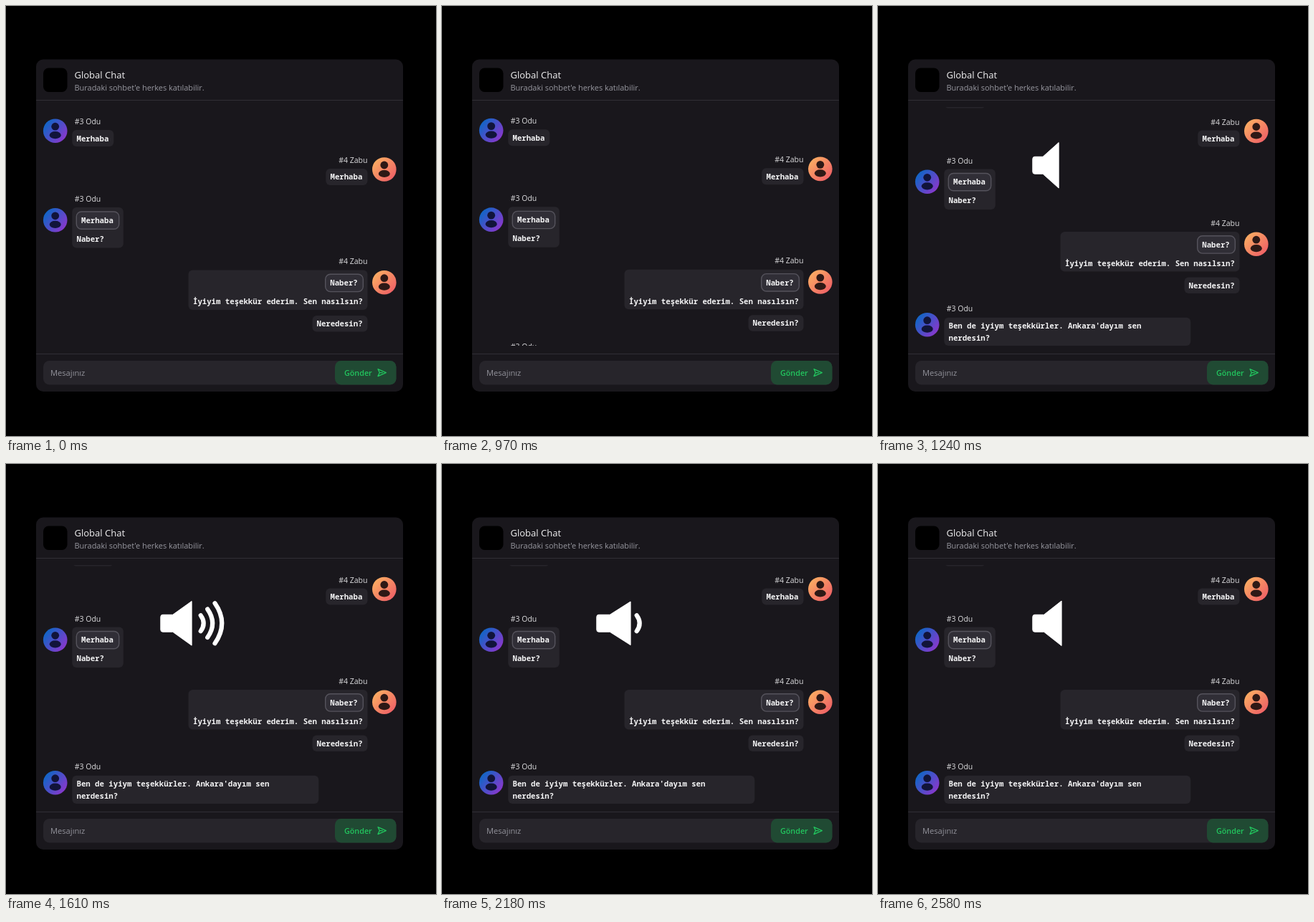
Write an HTML page that moves like this. It is 600 px wide and 600 px high and loops after 2.61 s.

```html
<!DOCTYPE html>
<html lang="tr">
<head>
<meta charset="utf-8">
<title>Global Chat</title>
<style>
  html, body { margin: 0; width: 100%; height: 100%; overflow: hidden; background: #000; }
  svg { display: block; width: 600px; height: 600px; }
  text { font-family: "Open Sans", "Noto Sans", sans-serif; white-space: pre; }
  .name { font-size: 10.5px; fill: #dedee0; }
  .msg { font: 600 10.68px "Noto Sans Mono", "DejaVu Sans Mono", monospace; fill: #f4f4f5; }
  .bubble, .field { fill: #27252b; }
  .quote { fill: #302e36; stroke: #55535c; stroke-width: 1.4; }
  .rule { stroke: #302e35; }
  .wave { fill: none; stroke: #fff; stroke-width: 6.2; stroke-linecap: round; }
  .plane { fill: none; stroke: #22c55e; stroke-width: 1.3; stroke-linejoin: round; stroke-linecap: round; }
</style>
</head>
<body>
<svg viewBox="0 0 600 600">
  <defs>
    <linearGradient id="blue" x1="0" y1="0.1" x2="1" y2="0.9">
      <stop offset="0.15" stop-color="#1763c6"/><stop offset="0.95" stop-color="#8f35cc"/>
    </linearGradient>
    <linearGradient id="orange" x1="0" y1="0" x2="1" y2="1">
      <stop offset="0.1" stop-color="#fbae62"/><stop offset="0.9" stop-color="#ee5f66"/>
    </linearGradient>
    <clipPath id="view"><rect x="42" y="141" width="512" height="333"/></clipPath>
  </defs>

  <rect x="42" y="74.5" width="512" height="463.5" rx="10" fill="#19171c"/>
  <rect x="52" y="86.5" width="33.5" height="33.5" rx="7.5" fill="#000"/>
  <text x="95.5" y="100.7" font-size="13" fill="#f0f0f1">Global Chat</text>
  <text x="95.5" y="117.5" font-size="10.95" fill="#97979f">Buradaki sohbet'e herkes katılabilir.</text>
  <path class="rule" d="M42 131.5H554M42 485.5H554"/>

  <g clip-path="url(#view)"><g id="list"></g></g>

  <rect class="field" x="52" y="495" width="492.5" height="33.5" rx="8.5"/>
  <text x="62" y="516" font-size="11.15" fill="#92929a">Mesajınız</text>
  <rect x="459" y="495" width="85.5" height="33.5" rx="8.5" fill="#204a33"/>
  <text x="472" y="516" font-size="10.75" font-weight="600" fill="#22c55e">Gönder</text>
  <path class="plane" d="M519 506.6L530.3 511.6L519 516.6L521.3 511.6ZM521.3 511.6H525.5"/>

  <g id="sound">
    <path id="horn" fill="#fff" stroke="#fff" stroke-width="1" stroke-linejoin="round"/>
    <g id="waves"></g>
  </g>
</svg>
<script>
const LOOP = 2610;
const SCROLL = { start: 935, length: 250, distance: 53.5 };
const SOUND = { start: 1120, origin: 1240, period: 740 };
const USERS = {
  odu: { label: "#3 Odu", x: 95.7, anchor: "start", cx: 68.7, paint: "blue", ink: "#11143a" },
  zabu: { label: "#4 Zabu", x: 504.5, anchor: "end", cx: 527.8, paint: "orange", ink: "#2e1916" }
};

const $ = id => document.getElementById(id);

function add(parent, tag, attrs, content) {
  const el = document.createElementNS("http://www.w3.org/2000/svg", tag);
  for (const key in attrs) el.setAttribute(key, attrs[key]);
  if (content) el.textContent = content;
  parent.appendChild(el);
  return el;
}

// An entry is a group with the sender's name on its baseline and the avatar centred on cy.
function entry(user, y, cy) {
  const { label, x, anchor, cx, paint, ink } = USERS[user];
  const group = add($("list"), "g", {});
  add(group, "text", { class: "name", x, y, "text-anchor": anchor }, label);
  add(group, "circle", { cx, cy, r: 16.8, fill: `url(#${paint})` });
  add(group, "circle", { cx, cy: cy - 6, r: 5.4, fill: ink });
  add(group, "ellipse", { cx, cy: cy + 6, rx: 8, ry: 5.1, fill: ink });
  return group;
}

const box = (parent, cls, x, y, width, height, rx = 6) =>
  add(parent, "rect", { class: cls, x, y, width, height, rx });
const line = (parent, x, y, content) => add(parent, "text", { class: "msg", x, y }, content);

const hello = entry("odu", 165, 174.2);
box(hello, "bubble", 92.3, 173, 58, 23);
line(hello, 98.5, 188.5, "Merhaba");

const helloBack = entry("zabu", 219, 228);
box(helloBack, "bubble", 446.3, 227, 58.2, 23);
line(helloBack, 452.5, 242.3, "Merhaba");

const question = entry("odu", 273, 298.8);
box(question, "bubble", 92.3, 281, 71.5, 56.5);
box(question, "quote", 98.3, 287, 59.4, 24.3, 7);
line(question, 105, 302.8, "Merhaba");
line(question, 98.5, 328.8, "Naber?");

const answer = entry("zabu", 360, 385.7);
box(answer, "bubble", 254.5, 368.5, 250, 55.5);
box(answer, "quote", 445.7, 374.3, 52.6, 24.3, 7);
line(answer, 452.3, 390.2, "Naber?");
line(answer, 261, 416.3, "İyiyim teşekkür ederim. Sen nasılsın?");
box(answer, "bubble", 427.5, 432, 77, 22.5);
line(answer, 433.5, 447, "Neredesin?");

const reply = entry("odu", 479.8, 498.2);
box(reply, "bubble", 92.3, 488.2, 344, 39.3);
line(reply, 98.5, 503.7, "Ben de iyiym teşekkürler. Ankara'dayım sen");
line(reply, 98.5, 520.1, "nerdesin?");

// x, half height, bulge, time shown and time hidden within one pulse
const waves = [
  [271.7, 11, 8, 180, 540],
  [281.2, 19.7, 14, 250, 510],
  [291.5, 28, 19.5, 320, 480]
].map(([x, half, bulge, on, off]) => ({
  on, off,
  el: add($("waves"), "path", {
    class: "wave",
    d: `M${x} ${222.3 - half}q${bulge} ${half} 0 ${2 * half}`
  })
}));

// time within one pulse, horn width
const pulse = [[0, 37.5], [200, 48.5], [370, 44.5], [600, 41.5], [740, 37.5]];

function valueAt(steps, t) {
  const i = Math.max(1, steps.findIndex(step => step[0] >= t));
  const [t0, a] = steps[i - 1], [t1, b] = steps[i];
  return a + (b - a) * (t - t0) / (t1 - t0);
}

const easeInOut = p => p < 0.5 ? 4 * p ** 3 : 1 - 4 * (1 - p) ** 3;

function drawSound(t) {
  const { start, origin, period } = SOUND;
  $("sound").style.display = t < start ? "none" : "";
  const phase = (t - origin + 2 * period) % period;
  const w = valueAt(pulse, phase);
  const left = 215.8, right = 214.6 + w, neck = left + w * 0.38;
  const half = 31.8 - (w - 37.5) * 0.136;
  $("horn").setAttribute("d",
    `M${left + 3} 210.3H${neck}L${right} ${222.3 - half}V${222.3 + half}L${neck} 234.3H${left + 3}` +
    `Q${left} 234.3 ${left} 231.3V213.3Q${left} 210.3 ${left + 3} 210.3Z`);
  // No wave precedes the first pulse.
  for (const { el, on, off } of waves)
    el.style.display = t >= origin && phase >= on && phase < off ? "" : "none";
}

function draw(now) {
  const t = now % LOOP;
  const p = Math.min(1, Math.max(0, (t - SCROLL.start) / SCROLL.length));
  $("list").setAttribute("transform", `translate(0 ${-SCROLL.distance * easeInOut(p)})`);
  reply.style.display = t < SCROLL.start ? "none" : "";
  drawSound(t);
  requestAnimationFrame(draw);
}
requestAnimationFrame(draw);
</script>
</body>
</html>
```
